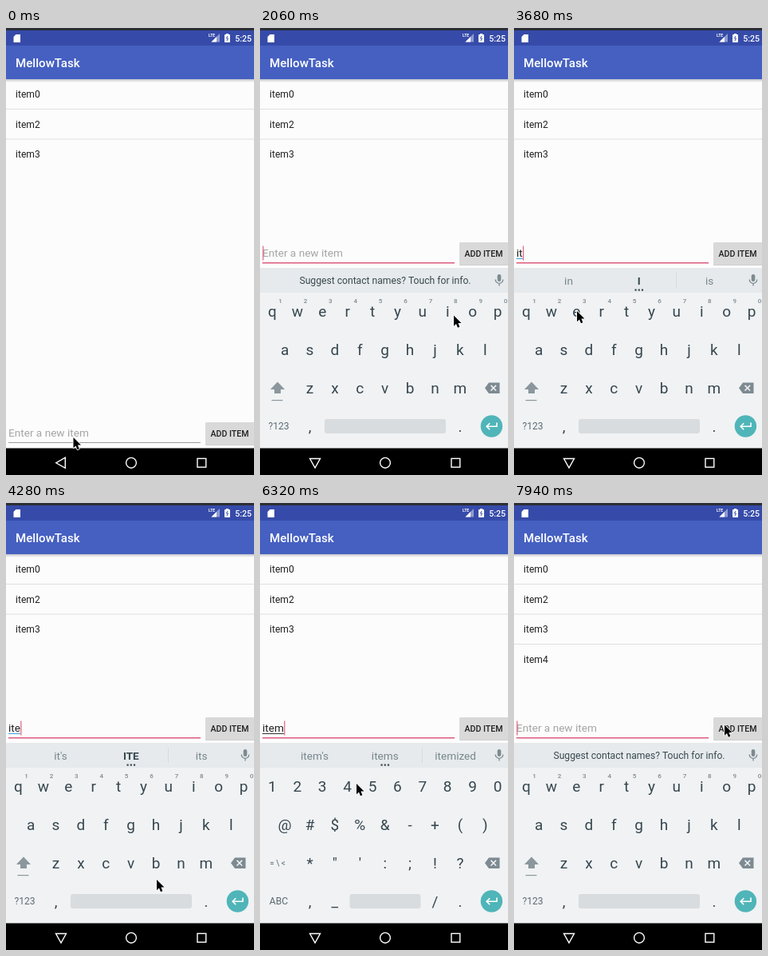
Write an HTML page with a canvas that moves like this. It is 311 px wide and 559 px high and loops after 8000 ms.

```html
<!DOCTYPE html>
<html lang="en">
<head>
<meta charset="utf-8">
<title>To-do list</title>
<style>
  html, body { margin: 0; width: 100%; height: 100%; overflow: hidden; background: #fcfcfc; }
  canvas { display: block; width: 311px; height: 559px; }
</style>
</head>
<body>
<canvas></canvas>
<script>
const W = 311, H = 559, LOOP = 8000, STEP = 147;
const INK = '#37474f', SOFT_INK = '#78868d', ICON = '#7d8a91', PAPER = '#fcfcfc', KEYS = '#f0f2f4';
const PITCH = 31.4, ROW = 48;
const canvas = document.querySelector('canvas');
const ctx = canvas.getContext('2d');
const ratio = window.devicePixelRatio || 1;
canvas.width = W * ratio;
canvas.height = H * ratio;

const FOCUS = 6, OPEN = 7, SYMBOLS = 39, PRESS = 52, ADDED = 53;
const KEYSTROKES = [17, 23, 26, 33, 46];
const SUGGESTION_LAG = 3;

const pointerStops = [
  { step: 0, x: 84.5, y: 512 },
  { step: 8, x: 85, y: 504 },
  { step: 14, x: 243, y: 359.5 },
  { step: 21, x: 136, y: 353 },
  { step: 25, x: 79, y: 354 },
  { step: 29, x: 189, y: 471 },
  { step: 32, x: 249, y: 450 },
  { step: 35, x: 163.5, y: 500 },
  { step: 38, x: 25, y: 498 },
  { step: 43, x: 121, y: 351 },
  { step: 46, x: 111, y: 354 },
  { step: 52, x: 264, y: 277.5 }
];

const suggestions = {
  i: ['in', 'I', 'is'],
  it: ["it's", 'IT', 'its'],
  ite: ["it's", 'ITE', 'its'],
  item: ["item's", 'items', 'itemized'],
  item4: ['item', 'item4', 'items']
};
const letterRows = ['qwertyuiop', 'asdfghjkl', 'zxcvbnm'];
const symbolRows = ['1234567890', '@#$%&-+()', '*"\':;!?'];

const typedAt = step =>
  step < ADDED ? 'item4'.slice(0, KEYSTROKES.filter(k => k <= step).length) : '';

function text(str, x, y, size, color, align = 'left', weight = 400) {
  ctx.font = `${weight} ${size}px Roboto, sans-serif`;
  ctx.textAlign = align;
  ctx.fillStyle = color;
  ctx.fillText(str, x, y);
}

function rect(x, y, w, h, color, radius = 0) {
  ctx.fillStyle = color;
  ctx.beginPath();
  ctx.roundRect(x, y, w, h, radius);
  ctx.fill();
}

function circle(x, y, r) {
  ctx.beginPath();
  ctx.arc(x, y, r, 0, 2 * Math.PI);
}

function fillPath(d, color) {
  ctx.fillStyle = color;
  ctx.fill(new Path2D(d));
}

function strokePath(d, color, width) {
  ctx.strokeStyle = color;
  ctx.lineWidth = width;
  ctx.stroke(new Path2D(d));
}

function at(x, y, draw) {
  ctx.save();
  ctx.translate(x, y);
  draw();
  ctx.restore();
}

function drawHeader() {
  const shadow = ctx.createLinearGradient(0, 64, 0, 68);
  shadow.addColorStop(0, '#c4c4c8');
  shadow.addColorStop(1, PAPER);
  rect(0, 64, W, 4, shadow);
  rect(0, 22, W, 42, '#4560c1');
  rect(0, 3, W, 19, '#364ba9');
  rect(0, 0, W, 3, '#2c2e34');
  text('MellowTask', 12, 49, 15.1, '#fff', 'left', 500);

  fillPath('M12.5 8 H18 V18 H9.5 V11 Z', '#fff');
  fillPath('M268 7 V17.5 H257.5 Z', '#8f9bd0');
  fillPath('M264 11 V17.5 H257.5 Z', '#fff');
  text('LTE', 254, 11, 5, '#fff', 'left', 700);
  rect(274, 8, 7, 10, '#fff', 0.8);
  rect(276, 7, 3, 2, '#fff');
  strokePath('M278 10 L276.5 13 H278.5 L277 16', '#364ba9', 1);
  text('5:25', 308, 16.5, 10.6, '#fff', 'right', 500);
}

function drawItems(items) {
  items.forEach((item, i) => {
    const top = 63.5 + i * 37.5;
    if (i) rect(0, top, W, 1, '#e0e0e0');
    text(item, 12, top + 23.8, 12.1, '#212121');
  });
}

function drawEntry(value, y, focused, pressed, settled) {
  text(value || 'Enter a new item', 3, y, 13.6, value ? '#212121' : '#a5a5a5');
  const width = value ? ctx.measureText(value).width : 0;
  rect(3, y + 2, width, 1, settled ? '#333' : '#3fa0dc');
  if (focused) rect(3.3 + width, y - 13.5, 1.2, 18, '#e0607f');
  rect(3, y + 7, 241, focused ? 1.5 : 1, focused ? '#dd5c80' : '#9c9c9c');
  rect(250, y - 17, 62, 28, '#cfcfcf', 1.5);
  rect(250, y - 18, 62, 28, pressed ? '#c8c9c9' : '#d9d9d9', 1.5);
  text('ADD ITEM', 280.5, y - 0.4, 10.6, '#212121', 'center', 500);
}

function drawSuggestions(words) {
  rect(0, 300, W, 31, '#e6eaec');
  if (words) {
    words.forEach((word, i) => {
      const strong = word === word.toUpperCase();
      text(word, 68.5 + i * 88.3, 321, 13.6, strong ? INK : SOFT_INK, 'center', strong ? 700 : 400);
    });
    rect(203, 306, 1, 19, '#d6dbde');
    for (let i = -1; i <= 1; i++) rect(155.7 + i * 4.2, 326.5, 2.2, 2.2, INK);
  } else {
    text('Suggest contact names? Touch for info.', 157, 320, 12.15, INK, 'center');
  }
  rect(297.7, 308, 4.6, 9, ICON, 2.3);
  strokePath('M295.2 314.5 a4.8 4.8 0 0 0 9.6 0 M300 319.3 v3.2', ICON, 1.3);
}

function drawKeyboard(words, symbolic) {
  rect(0, 300, W, 227, KEYS);
  drawSuggestions(words);
  const label = (key, column, row) =>
    text(key, 15.4 + column * PITCH, 361 + row * ROW, 19, INK, 'center');
  (symbolic ? symbolRows : letterRows).forEach((keys, row) => {
    const indent = (10 - keys.length) / 2;
    [...keys].forEach((key, i) => label(key, indent + i, row));
  });
  label(',', 1.5, 3);
  label('.', 7.5, 3);
  text(symbolic ? 'ABC' : '?123', 23.5, 502, 12.1, '#5c6b73', 'center');

  if (symbolic) {
    text('= \\ <', 22, 453.5, 10, '#5c6b73', 'center');
    label('_', 2.5, 3);
    label('/', 6.5, 3);
    rect(112.5, 489, 89, 18, '#d8dcdf', 3);
  } else {
    [...symbolRows[0]].forEach((digit, i) => {
      text(digit, 25.5 + i * PITCH, 344, 8, ICON, 'center', 500);
    });
    fillPath('M22 442.5 l9 9.5 h-5 v5 h-8 v-5 h-5 Z', '#8b979d');
    rect(14.5, 465, 14, 1.2, '#8b979d');
    rect(81, 489, 152, 18, '#d8dcdf', 3);
  }

  fillPath('M282 450.2 l5 -6.7 h13.5 v13.4 h-13.5 Z', ICON);
  strokePath('M289.5 446.9 l6.6 6.6 m0 -6.6 l-6.6 6.6', KEYS, 1.5);
  circle(290.4, 498, 13.7);
  ctx.fillStyle = '#4fb5b8';
  ctx.fill();
  strokePath('M297 493.5 v4.7 h-12.5 M288.2 494.2 l-4 4 l4 4', '#fff', 1.6);
}

function drawNavigation(keyboardOpen) {
  rect(0, 525.5, W, 34, '#000');
  const back = keyboardOpen ? 'M62.5 538.5 h13 l-6.5 11.5 Z' : 'M62.7 543.8 l11.6 -6.6 v13.2 Z';
  strokePath(back, '#fff', 1.4);
  circle(157, 543.8, 6.4);
  ctx.stroke();
  ctx.strokeRect(240, 538.4, 10.8, 10.8);
}

function drawPointer(step) {
  const from = pointerStops.findLast(stop => stop.step <= step);
  const to = pointerStops.find(stop => stop.step > step) || from;
  const u = (step - from.step) / (to.step - from.step || 1);
  const eased = u * u * (3 - 2 * u);
  at(from.x + (to.x - from.x) * eased, from.y + (to.y - from.y) * eased, () => {
    const arrow = 'M0 0 V13.2 L3 10.4 L5 15.2 L7.4 14.2 L5.4 9.5 H9.5 Z';
    ctx.lineJoin = 'round';
    strokePath(arrow, '#fff', 1.6);
    fillPath(arrow, '#000');
  });
}

function draw(step) {
  const rise = Math.min(1, Math.max(0, (step - OPEN) / 2));
  const symbolic = step >= SYMBOLS && step < ADDED;
  const seen = step < ADDED ? typedAt(step - SUGGESTION_LAG) : '';
  const items = ['item0', 'item2', 'item3'];
  if (step >= ADDED) items.push('item4');

  ctx.setTransform(ratio, 0, 0, ratio, 0, 0);
  rect(0, 0, W, H, PAPER);
  drawHeader();
  drawItems(items);
  drawEntry(typedAt(step), rise === 1 ? 286 : 511, step >= FOCUS, step === PRESS, symbolic);
  if (rise) at(0, 226 * (1 - rise), () => drawKeyboard(suggestions[seen], symbolic));
  drawNavigation(rise > 0);
  drawPointer(step);
}

function tick() {
  const time = performance.now() % LOOP;
  draw(Math.min(54, Math.floor((time + 5) / STEP)));
  requestAnimationFrame(tick);
}
tick();
</script>
</body>
</html>
```
